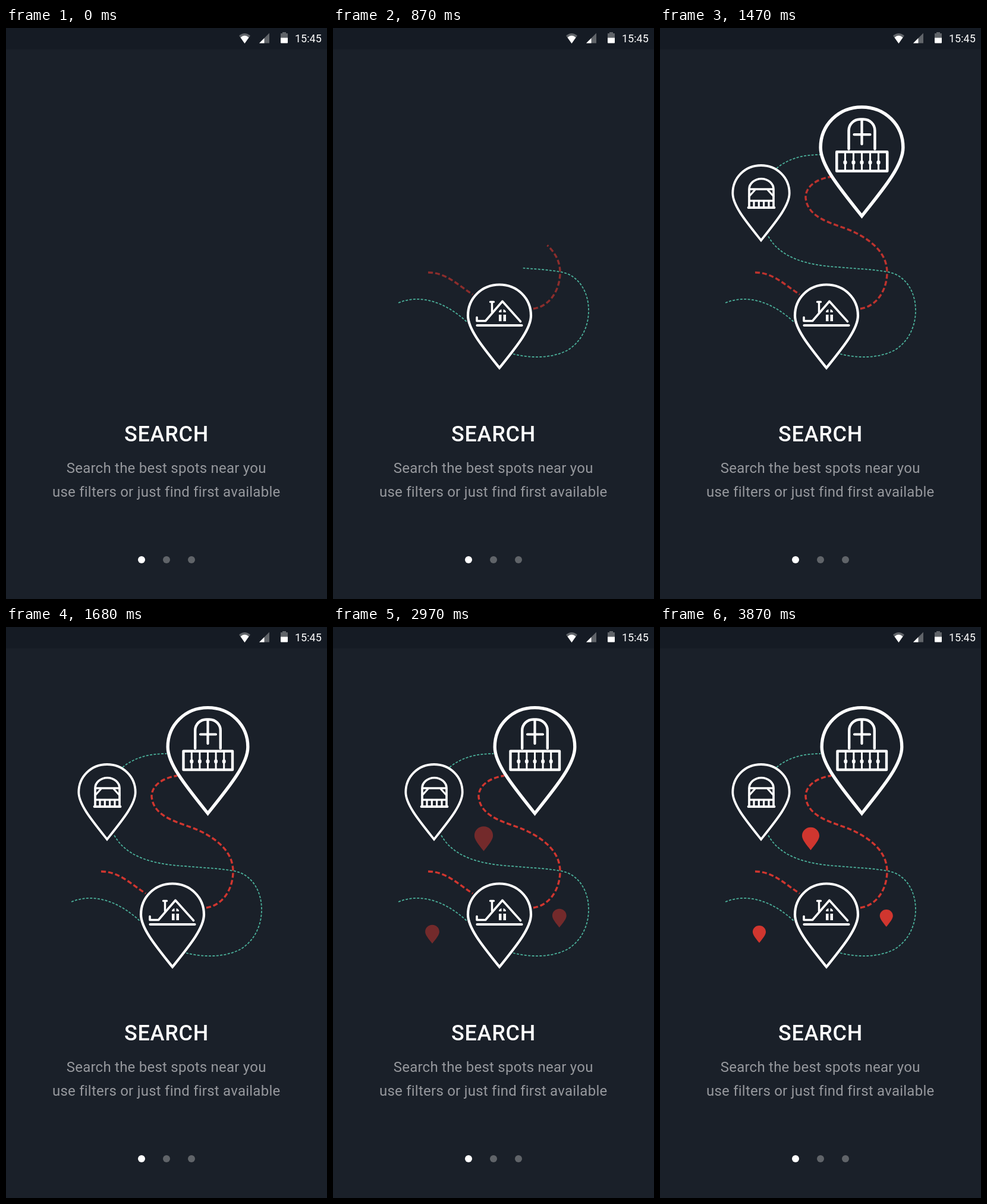
Animation, 540 px wide and 960 px high, one loop 5400 ms. Source, as an HTML page with a canvas:

```html
<!DOCTYPE html>
<html lang="en">
<head>
<meta charset="utf-8">
<title>Search onboarding</title>
<style>
  html, body { margin: 0; width: 100%; height: 100%; overflow: hidden; background: #1a2029; }
  svg, canvas { position: absolute; left: 0; top: 0; width: 540px; height: 960px; }
  text { font-family: Roboto, sans-serif; fill: #fff; }
  .mid { text-anchor: middle; }
  .title { font-size: 36px; font-weight: 500; letter-spacing: .02em; }
  .body { font-size: 24px; letter-spacing: .01em; fill: #96989d; }
  .dim { fill: #606469; }
  .lit { fill: #fff; }
</style>
</head>
<body>
<svg viewBox="0 0 540 960">
  <rect width="540" height="36" fill="#151b24"/>
  <path class="dim" d="M401.500 26 L392 13 Q401.500 5 411 13 Z"/>
  <path class="lit" d="M401.500 26 L394.500 16 Q401.500 9.500 408.500 16 Z"/>
  <path class="dim" d="M426 25.500 L443 8.500 V25.500 Z"/>
  <path class="lit" d="M426 25.500 L434.500 17 V25.500 Z"/>
  <path class="dim" d="M462 9 H465 V7 H471 V9 H474 V17 H462 Z"/>
  <path class="lit" d="M462 16.500 H474 V24.500 Q474 25.500 473 25.500 H463 Q462 25.500 462 24.500 Z"/>
  <text x="486" y="24" font-size="18">15:45</text>
  <text class="mid title" x="270" y="695">SEARCH</text>
  <text class="mid body" x="269.700" y="748">Search the best spots near you</text>
  <text class="mid body" x="269.700" y="788">use filters or just find first available</text>
  <circle class="lit" cx="228" cy="894" r="6"/>
  <circle class="dim" cx="270" cy="894" r="6"/>
  <circle class="dim" cx="312" cy="894" r="6"/>
</svg>
<canvas id="stage" width="540" height="960"></canvas>
<script>
const LOOP = 5400, STEP = 30;
const ctx = document.getElementById('stage').getContext('2d');
const clamp = (v, lo = 0, hi = 1) => Math.min(hi, Math.max(lo, v));
const smooth = u => u * u * (3 - 2 * u);

// A visible stretch of a route; gap is the hidden length before it.
function stretch(d, gap = 0) {
  const el = document.createElementNS('http://www.w3.org/2000/svg', 'path');
  el.setAttribute('d', d);
  return { path: new Path2D(d), gap, len: el.getTotalLength() };
}

function route(color, width, on, off, parts) {
  const total = parts.reduce((sum, p) => sum + p.gap + p.len, 0);
  return { color, width, on, off, parts, total };
}

const green = route('#4bb09a', 1.8, 4, 2.4, [
  stretch('M110 462 C150 446 192 463 226 495'),
  stretch('M303 548 C330 555 365 556 392 543 C415 531 430 505 430 475 C430 441 411 414 382 410 ' +
          'C355 405 330 405 300 402 C250 399 203 388 182 350', 95),
  stretch('M196 236 C217 219 240 213 270 213', 115)
]);
const red = route('#d0362f', 3.4, 8, 4, [
  stretch('M160 411 C190 411 210 432 235 448'),
  stretch('M337 472 C365 468 382 440 382 411 C382 378 355 356 322 341 ' +
          'C295 329 248 322 245 285 C245 267 262 254 288 250', 105)
]);

function drawRoute(r, frac, alpha) {
  let left = r.total * frac;
  ctx.globalAlpha = alpha;
  ctx.strokeStyle = r.color;
  ctx.lineWidth = r.width;
  for (const p of r.parts) {
    left -= p.gap;
    if (left <= 0) break;
    const shown = Math.min(left, p.len), dash = [];
    for (let x = 0; x < shown; x += r.on + r.off) dash.push(Math.min(r.on, shown - x), r.off);
    dash[dash.length - 1] = 9999;
    ctx.setLineDash(dash);
    ctx.stroke(p.path);
    left -= p.len;
  }
  ctx.setLineDash([]);
  ctx.globalAlpha = 1;
}

// Scale of a pin popping in: overshoots to 1.18, then settles at 1.
function pop(t) {
  const peak = 1.18, at = .62;
  if (t <= 0) return 0;
  if (t >= 1) return 1;
  if (t > at) return peak - (peak - 1) * smooth((t - at) / (1 - at));
  const u = t / at;
  return peak * smooth(u) + 1.2 * at * u * (1 - u) ** 2;
}

const outline = new Path2D('M0 -70 C30 -70 53 -47 53 -18 C53 5 28 35 0 70 C-28 35 -53 5 -53 -18 C-53 -47 -30 -70 0 -70 Z');

// Icon strokes are in stage coordinates.
const house = {
  x: 280, y: 501.5, size: 1, start: 384,
  lines: [
    [4.2, 'M242.500 500 H317.500'],
    [3.6, 'M242 486.500 V492.500 H256.500 L285 459.500 L315.500 493.500'],
    [3.4, 'M264.500 460.500 H270.500 M267.500 461 V478']
  ],
  fill: 'M279 478 Q279 474 283.500 473 V478 Z M291 478 Q291 474 286.500 473 V478 Z ' +
        'M279 482 H283.500 V493 H279 Z M286.500 482 H291 V493 H286.500 Z'
};
const porch = {
  x: 170, y: 294, size: .9, start: 1014,
  lines: [
    [3.7, 'M150 302 V271 A20.500 17.500 0 0 1 191 271 V302 M150 271 H191 M150 290.500 H191'],
    [3.2, 'M150 283 L160 272 M191 283 L181 272 M158 291 V302 M166.300 291 V302 M174.600 291 V302 M183 291 V302'],
    [3.8, 'M148.500 302 H192.500']
  ]
};
const balusters = d => [-2, -1, 0, 1, 2].map(i => `M${339.5 + 13.6 * i} ${d}`).join(' ');
const balcony = {
  x: 339.5, y: 224.5, size: 1.27, start: 1284,
  lines: [
    [4.4, 'M318.200 204 V174 A18.500 18.500 0 0 1 336.700 155.500 H342.300 A18.500 18.500 0 0 1 360.800 174 V204'],
    [4.2, 'M339.500 156 V196 M327 180.500 H353'],
    [4.4, 'M298.500 208.800 H381 V240 H298.500 Z'],
    [3, balusters('210 V239')],
    [6, balusters('225.500 V226.500')]
  ]
};
const places = [house, porch, balcony];
for (const p of places) {
  p.lines = p.lines.map(([w, d]) => [w, new Path2D(d)]);
  p.fill = p.fill && new Path2D(p.fill);
}

function drawPlace(p, t) {
  const s = pop((t - p.start) / 400);
  if (!s) return;
  ctx.save();
  ctx.translate(p.x, p.y);
  ctx.scale(s, s);
  ctx.strokeStyle = ctx.fillStyle = '#fff';
  ctx.save();
  ctx.scale(p.size, p.size);
  ctx.lineWidth = 4.2;
  ctx.lineCap = 'butt';
  ctx.lineJoin = 'miter';
  ctx.stroke(outline);
  ctx.restore();
  ctx.translate(-p.x, -p.y);
  ctx.lineCap = ctx.lineJoin = 'round';
  for (const [w, path] of p.lines) {
    ctx.lineWidth = w;
    ctx.stroke(path);
  }
  if (p.fill) ctx.fill(p.fill);
  ctx.restore();
}

const spots = [[253.5, 356, 19.2], [167, 516.5, 14.6], [380.8, 489.5, 14.6]];

function drawSpot([x, y, half], t) {
  const u = clamp((t - 2100) / 1770), s = pop(u) * half / 70;
  if (!s) return;
  ctx.save();
  ctx.globalAlpha = u;
  ctx.fillStyle = '#d0362f';
  ctx.translate(x, y);
  ctx.scale(s, s);
  ctx.fill(outline);
  ctx.restore();
}

function render(t) {
  ctx.clearRect(0, 0, 540, 960);
  const frac = clamp(.927 * (t / 1200) ** 1.3);
  drawRoute(green, frac, 1);
  drawRoute(red, frac, clamp(.23 + .00046 * t));
  spots.forEach(s => drawSpot(s, t));
  places.forEach(p => drawPlace(p, t));
}

const begin = performance.now();
function tick() {
  const t = (performance.now() - begin) % LOOP;
  render(Math.floor(t / STEP) * STEP);
  requestAnimationFrame(tick);
}
tick();
</script>
</body>
</html>
```
